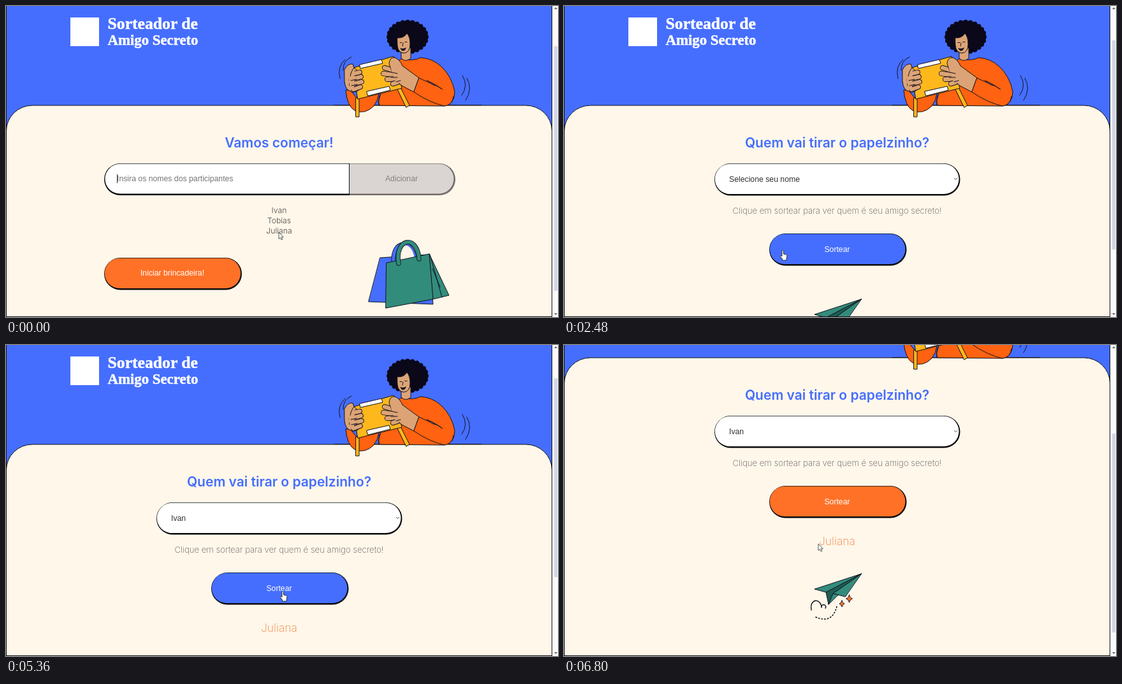
Write an HTML page that moves like this. It is 866 px wide and 488 px high and loops after 6880 ms.

```html
<!DOCTYPE html>
<html lang="pt-BR">
<head>
<meta charset="utf-8">
<title>Sorteador de Amigo Secreto</title>
<style>
  html, body { margin: 0; width: 100%; height: 100%; overflow: hidden; background: #456eff; }
  svg { display: block; width: 866px; height: 488px; }
  text { font: 12.25px "Liberation Sans", Arial, sans-serif; }
  .mid { text-anchor: middle; }
  .logo { font: bold 25.7px "Liberation Serif", serif; fill: #fff; stroke: #fff; stroke-width: .5; }
  .logo.small { font-size: 22.8px; }
  .title { font: 600 21px Inter, sans-serif; fill: #456eff; }
  .name { font: 300 12.2px Inter, sans-serif; fill: #4c4644; }
  .hint { font: 200 13.2px Inter, sans-serif; fill: #5d5654; }
  .result { font: 200 17.5px Inter, sans-serif; fill: #f0803f; }
  .ink { stroke: #14121c; stroke-width: 1; stroke-linejoin: round; stroke-linecap: round; }
  .line { fill: none; }
</style>
</head>
<body>
<svg viewBox="0 0 866 488" id="stage"></svg>
<script>
const LOOP = 6880, STEP = 80;
const BLUE = '#456eff', ORANGE = '#ff7127', CREAM = '#fef7ea';
const SHIRT = '#ff6210', SKIN = '#dca476', GOLD = '#ffb81c', GREEN = '#328c7c';
const PLAYERS = ['Ivan', 'Tobias', 'Juliana'];

const shape = (d, fill) => `<path class="ink" d="${d}" fill="${fill}"/>`;
const line = (d, extra = '') => `<path class="ink line" d="${d}" ${extra}/>`;
const label = (x, y, cls, txt, extra = '') => `<text x="${x}" y="${y}" class="${cls}" ${extra}>${txt}</text>`;

// Thick rounded stroke with a dark outline
const limb = (d, w, color, cap = 'round') => [[w + 1.8, '#14121c'], [w, color]].map(([sw, c]) =>
  `<path d="${d}" fill="none" stroke="${c}" stroke-width="${sw}" stroke-linecap="${cap}"/>`).join('');

// Rounded box with a heavier right and bottom edge
const pill = (x, y, w, h, fill, id = '') => `
  <rect x="${x}" y="${y}" width="${w}" height="${h}" rx="${h / 2}" fill="#0b0a0c"/>
  <rect ${id && `id="${id}"`} x="${x + .8}" y="${y + .8}" width="${w - 2.8}" height="${h - 3.2}" rx="${(h - 3.2) / 2}" fill="${fill}"/>`;

function hair() {
  let out = '<ellipse cx="630" cy="48.5" rx="30.5" ry="24.5"/>';
  for (let i = 0; i < 24; i++) {
    const a = i * Math.PI / 12;
    out += `<circle cx="${630 + 29 * Math.cos(a)}" cy="${48.5 + 23 * Math.sin(a)}" r="4"/>`;
  }
  return `<g fill="#0a0819">${out}</g>`;
}

const woman = `
  ${line('M515 155.5H746')}
  ${hair()}
  ${shape('M620 83Q640 87 650 81Q669 82 683 95Q699 110 704 134Q704 154 688 157L586 156L584 150L600 100Z', SHIRT)}
  ${shape('M620 68V82Q627 89 635 82V66Z', SKIN)}
  ${shape('M614 50Q624 51 629 43Q634 48 634 60Q634 73 624 74Q615 73 614 62Z', SKIN)}
  ${line('M618 57.5h3M626 56.5h3M623 58l-1 5', 'stroke-width=".8"')}
  <path d="M618 66Q624 68 628 65Q626 72 621 70Z" fill="#14121c"/>
  ${shape('M533 132Q535 157 547 164Q563 171 577 157Q584 148 585 137L550 144L541 133Z', SHIRT)}
  ${shape('M549 144H554V174H549Z', GOLD)}
  ${shape('M614 130L619 128L633 156L628 159Z', GOLD)}
  ${shape('M545 97L608 79L621 129L552 146Z', GOLD)}
  ${shape('M555 92L589 84L591 90L556 98Z', '#fff')}
  ${shape('M566 134L601 126L603 132L568 141Z', '#fff')}
  ${shape('M531 100Q536 90 544 91L546 97L551 101L557 128Q550 138 541 134Q532 132 531 118Z', SKIN)}
  ${['M541 107L555 104', 'M541 115L557 111', 'M542 123L558 119', 'M545 131L556 127'].map(d => limb(d, 6, SKIN)).join('')}
  <path d="M533 101Q538 113 540 132L546 130L547 103L541 94Z" fill="${SKIN}"/>
  ${line('M540 110Q542 101 546 97M541 117l9-2M542 125l9-2')}
  ${['M594 97L614 103', 'M592 106L614 109', 'M598 115L617 114', 'M607 122L620 118'].map(d => limb(d, 6.5, SKIN)).join('')}
  ${shape('M601 90Q602 80 610 81Q618 84 622 94L648 113L640 135L621 125L610 115Z', SKIN)}
  <path d="M603 94L612 88L622 99L627 124L611 119L606 107Z" fill="${SKIN}"/>
  ${line('M605 104l9 2M604 112l10 0M612 119l7-2')}
  ${shape('M648 113Q665 121 677 126L702 141Q701 155 688 157Q665 152 640 135Z', SHIRT)}
  <path d="M661 117L673 125L668 123Z" fill="${BLUE}" stroke="#14121c" stroke-width=".6"/>
  <path d="M685 130L701 127L703 139L697 149L684 151Z" fill="${SHIRT}"/>
  ${line('M660 117Q675 123 683 130')}
  ${line('M586 140Q584 148 585 156')}
  ${line('M532 84Q519 95 524 114M542 80Q528 86 529 101M716 109Q726 125 715 140M723 113Q733 130 721 148')}`;

const bags = `
  ${shape('M587 395L664 390L670 468L569 464Z', BLUE)}
  ${limb('M608 403C605 364 640 366 642 400', 5, BLUE, 'butt')}
  <path d="M612 403C610 366 639 368 641 398Z" fill="${CREAM}"/>
  ${shape('M664 389L695 454L670 460Z', GREEN)}
  ${shape('M597 403L664 389L670 460L596 474Z', GREEN)}
  ${line('M665 390L684 457M669 412L681 441')}
  ${limb('M616 404C609 365 645 357 648 397', 5.5, GREEN)}`;

const star = (x, y, r) => shape(`M${x} ${y - r}q1 ${r - 1} ${r - 1} ${r}q${2 - r} 1 ${1 - r} ${r}q-1 ${1 - r} ${1 - r} ${-r}q${r - 2} -1 ${r - 1} ${-r}Z`, ORANGE);
const plane = `
  <g stroke-width="1.5">
    ${shape('M466.5 495L393 519L411 524Z', GREEN)}
    ${shape('M466.5 495L411 524L415 543L424 525Z', '#1d5d54')}
    ${shape('M466.5 495L422 526L441 531Z', GREEN)}
    ${shape('M415 543L422 526L430 528Z', GREEN)}
  </g>
  ${line('M388 552C385 532 404 534 404 548Q404 542 409 544Q412 546 410 549', 'style="stroke-width:1.4"')}
  ${line('M395 563Q421 574 428 546', 'stroke-dasharray="1.5 3.2" style="stroke-width:1.6"')}
  ${star(447.5, 534, 6)}${star(436, 542, 5)}`;

const header = `
  <rect x="101" y="18" width="45" height="45" fill="#fff"/>
  ${label(159.5, 36, 'logo', 'Sorteador de')}
  ${label(159.5, 61, 'logo small', 'Amigo Secreto')}
  <path d="M.5 800V196A41 40 0 0 1 41.5 156H815.5A41 40 0 0 1 856.5 196V800Z" fill="${CREAM}" stroke="#111"/>
  ${woman}`;

const entryPage = `
  ${label(428.5, 221.5, 'title mid', 'Vamos começar!')}
  <path d="M538 247H179a25 25 0 0 0 0 50H538Z" fill="#0b0a0c"/>
  <path d="M538 247.8H179a23.6 23.4 0 0 0 0 46.8H538Z" fill="#fff"/>
  <path d="M539 247H680a25 25 0 0 1 0 50H539Z" fill="#756b6a"/>
  <path d="M539 247.8H679a23.4 23.4 0 0 1 0 46.8H539Z" fill="#dad5d2"/>
  <path d="M538.5 247V297" stroke="#111"/>
  ${label(174, 275, '', 'Insira os nomes dos participantes', 'fill="#757575"')}
  <path id="caret" d="M174.5 264V278" stroke="#333"/>
  ${label(620.5, 275, 'mid', 'Adicionar', 'fill="#858080"')}
  ${PLAYERS.map((p, i) => label(428.5, 325 + 16 * i, 'name mid', p)).join('')}
  ${pill(154, 395, 216, 50.5, ORANGE, 'startBtn')}
  ${label(261, 423, 'mid', 'Iniciar brincadeira!', 'fill="#fff"')}
  ${bags}`;

const drawPage = `
  ${label(428.5, 221.5, 'title mid', 'Quem vai tirar o papelzinho?')}
  ${pill(236, 247, 385.5, 50.5, '#fff')}
  <rect id="focus" x="608.5" y="247.5" width="12.5" height="48.5" fill="#b4d2ee" fill-opacity=".75" stroke="#8fc3f3"/>
  <path d="M612 270l2.5 2.5l2.5-2.5" fill="none" stroke="#555"/>
  <text id="choice" x="259" y="275.5" fill="#333"></text>
  ${label(428.5, 326, 'hint mid', 'Clique em sortear para ver quem é seu amigo secreto!')}
  ${pill(322, 357, 215.5, 50.5, ORANGE, 'drawBtn')}
  ${label(428.5, 386, 'mid', 'Sortear', 'fill="#fff"')}
  ${label(428.5, 450, 'result mid', PLAYERS[2], 'id="result"')}
  <g id="plane">${plane}</g>`;

document.getElementById('stage').innerHTML = `
  <rect width="866" height="488" fill="${BLUE}"/>
  <g id="page">${header}<g id="entry">${entryPage}</g><g id="draw">${drawPage}</g></g>
  <path d="M.5 0V488M856.5 0V488" stroke="#111"/>
  <rect x="857" width="9" height="488" fill="#fbfbfb"/>
  <rect id="thumb" x="860" width="5" rx="1" fill="#d2d6e6"/>
  <path d="M860 5l2.5-3l2.5 3ZM860 482l2.5 3l2.5-3Z" fill="#666"/>
  <path d="M0 487.5H857" stroke="#111"/>
  <path id="arrow" d="M0 0V10.5L2.4 8.4L4.1 12L5.8 11.2L4.2 7.7H7.2Z" fill="#fff" stroke="#444" stroke-width=".9"/>
  <path id="hand" d="M-1 1Q.2-.8 1.4 1V6L5.5 7Q7 7.4 7 9L6 13.5V16H-.5V14L-4 9.5Q-3.5 7.6-1 9.5Z" fill="#fff" stroke="#222" stroke-width=".9"/>`;

const el = id => document.getElementById(id);
const show = (id, on) => { el(id).style.display = on ? '' : 'none'; };

// Rows of [ms, values...]
const CURSOR = [
  [0, 428, 355], [320, 430, 350], [800, 447, 327], [960, 440, 338], [1360, 327, 407.5], [1920, 327, 407.5],
  [2240, 338, 388], [2480, 343, 383], [2880, 360, 376], [3280, 535, 288], [3440, 560, 276], [3760, 560, 276],
  [4160, 452, 317], [4480, 452, 317], [5040, 434, 386], [6240, 434, 386], [6640, 399, 312], [6880, 399, 312]
];
const SCROLL = [[0, 0], [6000, 0], [6080, 9], [6160, 42], [6240, 85], [6320, 115], [6400, 131], [6480, 136], [6880, 136]];

function at(rows, t) {
  const i = Math.max(1, rows.findIndex(r => r[0] > t));
  const a = rows[i - 1], b = rows[i], k = (t - a[0]) / (b[0] - a[0]);
  return a.slice(1).map((v, j) => v + (b[j + 1] - v) * k);
}

const inside = (x, y, l, t, r, b) => x >= l && x <= r && y >= t && y <= b;

function render(t) {
  const [x, y] = at(CURSOR, t);
  const [scroll] = at(SCROLL, t);
  const entry = t < 1680, drawn = t >= 5360;
  const hot = entry ? inside(x, y, 154, 395, 370, 445) : inside(x, y + scroll, 322, 357, 537, 407);

  el('page').setAttribute('transform', `translate(0 ${-Math.round(scroll)})`);
  show('entry', entry);
  show('draw', !entry);
  show('caret', t < 1120);
  show('focus', t >= 3520 && t < 4400);
  show('result', drawn);
  el('choice').textContent = t < 4400 ? 'Selecione seu nome' : PLAYERS[0];
  el('plane').setAttribute('transform', `translate(0 ${drawn ? 0 : -35})`);
  el(entry ? 'startBtn' : 'drawBtn').setAttribute('fill', hot ? BLUE : ORANGE);

  const [top, size] = entry ? [63, 384] : drawn ? [52.3 + scroll * .638, 312] : [54, 328];
  el('thumb').setAttribute('y', top);
  el('thumb').setAttribute('height', size);

  show('arrow', !hot);
  show('hand', hot);
  el(hot ? 'hand' : 'arrow').setAttribute('transform', `translate(${x} ${y})`);
}

const start = performance.now();
function tick() {
  const t = (performance.now() - start) % LOOP;
  render(Math.floor(t / STEP) * STEP);
  requestAnimationFrame(tick);
}
tick();
</script>
</body>
</html>
```
